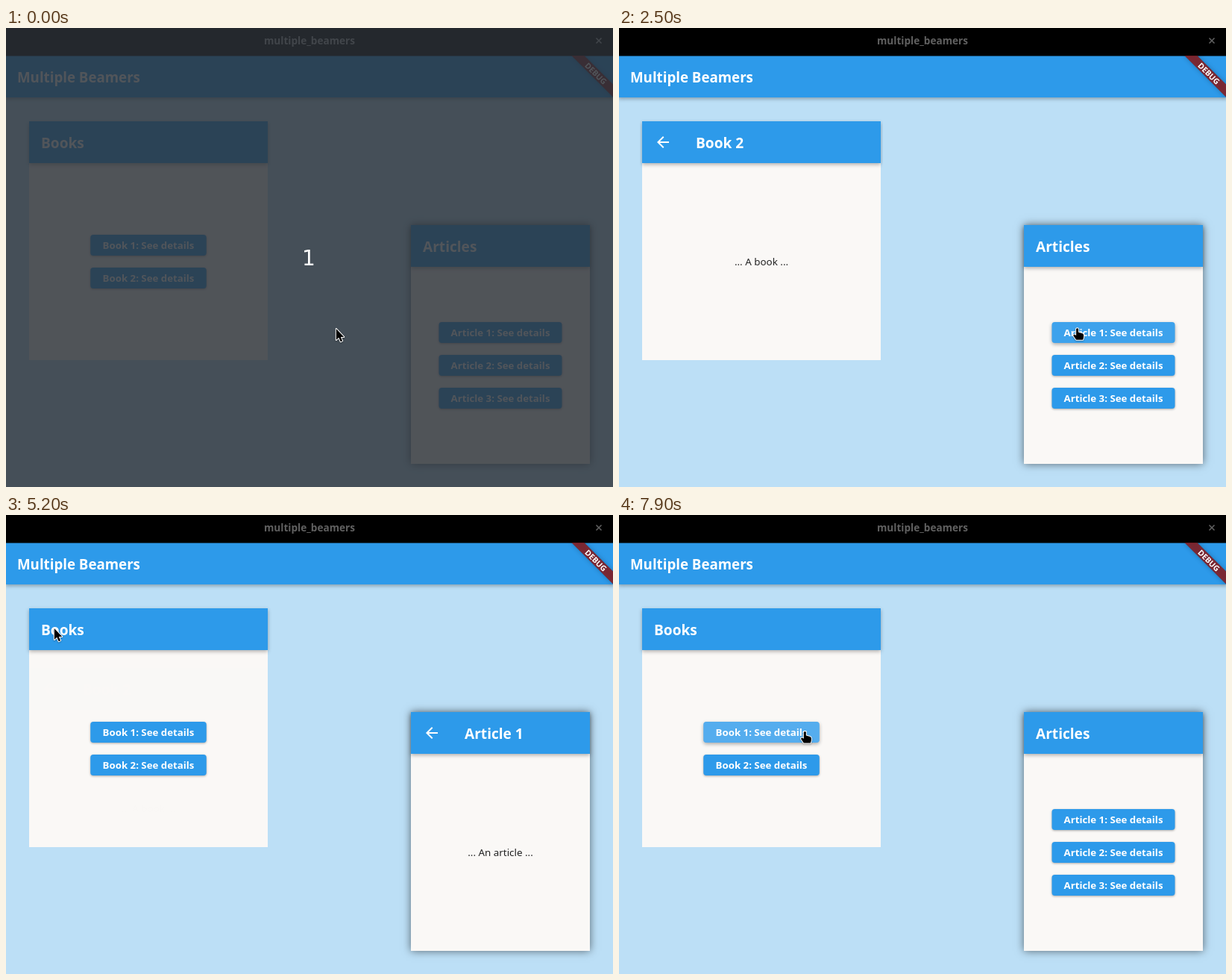
An HTML page with a canvas for the animation above (8000 ms loop, 814 by 615 pixels).

```html
<!DOCTYPE html>
<html lang="en">
<head>
<meta charset="utf-8">
<title>multiple_beamers</title>
<style>
html, body { margin: 0; width: 100%; height: 100%; overflow: hidden; background: #bcdff6; }
canvas { display: block; }
</style>
</head>
<body>
<canvas id="stage" width="814" height="615"></canvas>
<script>
const W = 814, H = 615, LOOP = 8000, STEP = 100, LAG = 100;
const APP_RIGHT = 815, APP_TOP = 37, BAR_H = 56, BUTTON_H = 28;
const BLUE = '#2d9aea', SKY = '#bcdff6', PAPER = '#faf8f6';
const FONT = '"Noto Sans", "Open Sans", sans-serif';
const stage = document.getElementById('stage').getContext('2d');
const layerCanvas = document.createElement('canvas');
layerCanvas.width = W;
layerCanvas.height = H;
const layer = layerCanvas.getContext('2d');

const backIcon = new Path2D('M20 11H7.83l5.59-5.59L12 4l-8 8 8 8 1.41-1.41L7.83 13H20v-2z');
const arrow = new Path2D('M0 0V15L3.5 11.8L5.9 17.3L8.3 16.2L6 11H10.4Z');
const hand = new Path2D('M-1 1Q.7-1 2 1V5.5L7.5 7Q9 7.6 9 9.5V12Q8.6 13.5 8 15.5H-1L-4.6 10.2Q-5.2 8.2-3 8.4L-1 9.8Z');

// opens and closes hold the start and end of each page transition
const books = {
  x: 31, y: 125, w: 320, h: 320, title: 'Books', item: 'Book', count: 2, open: 2,
  body: '... A book ...', buttonW: 155.5, clipped: true,
  opens: [1300, 1430], closes: [4910, 5210]
};
const articles = {
  x: 543, y: 264, w: 240, h: 320, title: 'Articles', item: 'Article', count: 3, open: 1,
  body: '... An article ...', buttonW: 165, clipped: false,
  opens: [2780, 3080], closes: [6240, 6540]
};

// start, end and destination of each pointer move
const origin = [442, 402];
const moves = [
  [0, 800, 237, 340], [1700, 2600, 618, 402], [3900, 4150, 674, 436], [4150, 4700, 64, 151],
  [5300, 5500, 249, 320], [5600, 6100, 562, 297], [7200, 7900, 248, 289]
];

const clamp = v => Math.max(0, Math.min(1, v));
const ramp = (t, [from, to]) => clamp((t - from) / (to - from));
const mix = (a, b, k) => a + (b - a) * k;
const easeOut = k => 1 - (1 - k) ** 2;

function bezier(x1, y1, x2, y2) {
  const axis = (a, b, s) => 3 * a * s * (1 - s) ** 2 + 3 * b * s * s * (1 - s) + s ** 3;
  return x => {
    let lo = 0, hi = 1;
    for (let i = 0; i < 24; i++) {
      const mid = (lo + hi) / 2;
      if (axis(x1, x2, mid) < x) lo = mid; else hi = mid;
    }
    return axis(y1, y2, lo);
  };
}
const easeIn = bezier(0.42, 0, 1, 1);
const fastOutSlowIn = bezier(0.4, 0, 0.2, 1);

function pointerAt(t) {
  let [x, y] = origin;
  for (const [from, to, toX, toY] of moves) {
    const k = easeOut(ramp(t, [from, to]));
    x = mix(x, toX, k);
    y = mix(y, toY, k);
  }
  return [x, y];
}

const detailShare = (p, t) => ramp(t, p.opens) - ramp(t, p.closes);
const clickable = (p, t) => [p.opens, p.closes].every(([from, to]) => t < from - LAG || t >= to);

function buttonBox(p, i) {
  const pitch = BUTTON_H + 16;
  const top = p.y + BAR_H + (p.h - BAR_H - p.count * pitch + 16) / 2;
  return [p.x + (p.w - p.buttonW) / 2, Math.round(top + pitch * (i - 1)), p.buttonW, BUTTON_H];
}

const inside = ([px, py], [x, y, w, h]) => px >= x && px < x + w && py >= y && py < y + h;
const overButton = (p, i, t) => inside(pointerAt(t), buttonBox(p, i));
const overBack = (p, t) => inside(pointerAt(t), [p.x, p.y, BAR_H, BAR_H]);

function overTarget(p, t) {
  if (!clickable(p, t)) return false;
  if (detailShare(p, t) === 1) return overBack(p, t);
  for (let i = 1; i <= p.count; i++) if (overButton(p, i, t)) return true;
  return false;
}

function text(c, str, x, y, size, color = '#fff', weight = 600, align = 'left') {
  c.font = `${weight} ${size}px ${FONT}`;
  c.fillStyle = color;
  c.textAlign = align;
  c.fillText(str, x, y);
}

function shadowed(c, blur, dy, alpha, draw) {
  c.save();
  c.shadowColor = `rgba(0,0,0,${alpha})`;
  c.shadowBlur = blur;
  c.shadowOffsetY = dy;
  draw();
  c.restore();
}

function bar(c, x, y, w) {
  c.fillStyle = BLUE;
  shadowed(c, 5, 2, 0.3, () => c.fillRect(x, y, w, BAR_H));
}

function disc(c, x, y, r, alpha) {
  c.fillStyle = `rgba(255,255,255,${alpha})`;
  c.beginPath();
  c.arc(x, y, r, 0, 7);
  c.fill();
}

function button(c, p, i, t) {
  const [x, y, w, h] = buttonBox(p, i);
  const hover = overButton(p, i, t);
  const shape = new Path2D();
  shape.roundRect(x, y, w, h, 4);
  c.fillStyle = BLUE;
  shadowed(c, hover ? 5 : 3, hover ? 2 : 1, 0.32, () => c.fill(shape));
  if (hover) {
    c.save();
    c.clip(shape);
    c.fillStyle = 'rgba(255,255,255,.08)';
    c.fill(shape);
    const start = p.opens[0] - LAG;
    const grow = ramp(t, [start, start + 300]);
    if (grow) disc(c, ...pointerAt(t), 150 * grow, 0.12);
    c.restore();
  }
  text(c, `${p.item} ${i}: See details`, p.x + p.w / 2, y + 19, 13.25, '#fff', 600, 'center');
}

function page(c, p) {
  c.fillStyle = PAPER;
  c.fillRect(p.x, p.y, p.w, p.h);
  bar(c, p.x, p.y, p.w);
}

function listPage(c, p, t) {
  page(c, p);
  text(c, p.title, p.x + 16, p.y + 36, 19.1);
  for (let i = 1; i <= p.count; i++) button(c, p, i, t);
}

function detailPage(c, p, t) {
  page(c, p);
  const cx = p.x + 28, cy = p.y + 28;
  c.save();
  c.beginPath();
  c.rect(p.x, p.y, p.w, BAR_H);
  c.clip();
  if (overBack(p, t)) disc(c, cx, cy, 27, 0.03);
  const start = p.closes[0] - LAG;
  const grow = ramp(t, [start, start + 150]);
  if (grow) disc(c, cx, cy, mix(10, 35, grow), 0.09);
  c.restore();
  c.save();
  c.translate(cx - 12, cy - 12);
  c.fillStyle = '#fff';
  c.fill(backIcon);
  c.restore();
  text(c, `${p.item} ${p.open}`, p.x + 72, p.y + 36, 19.1);
  text(c, p.body, p.x + p.w / 2, p.y + 193, 13.4, '#222', 400, 'center');
}

// the detail page fades in while it slides up a quarter of its height
function panel(p, t) {
  const k = detailShare(p, t);
  if (k < 1) listPage(stage, p, t);
  if (k === 0) return;
  layer.clearRect(0, 0, W, H);
  detailPage(layer, p, t);
  stage.save();
  if (p.clipped) {
    stage.beginPath();
    stage.rect(p.x - 3, p.y - 3, p.w + 6, p.h + 3);
    stage.clip();
  }
  stage.globalAlpha = easeIn(k);
  stage.drawImage(layerCanvas, 0, p.h / 4 * (1 - fastOutSlowIn(k)));
  stage.restore();
}

function titleBar(t) {
  const fade = ramp(t, [1100, 1500]);
  const black = mix(5, 0, fade), grey = mix(165, 96, fade);
  stage.fillStyle = `rgb(${black},${black},${black})`;
  stage.fillRect(0, 0, W, APP_TOP + 0.5);
  const ink = `rgb(${grey},${grey},${grey})`;
  text(stage, 'multiple_beamers', 407, 22, 13.6, ink, 600, 'center');
  stage.strokeStyle = ink;
  stage.lineWidth = 1.6;
  stage.beginPath();
  for (const side of [-3.5, 3.5]) {
    stage.moveTo(795 - side, 13.5);
    stage.lineTo(795 + side, 20.5);
  }
  stage.stroke();
}

function debugBanner() {
  stage.save();
  stage.beginPath();
  stage.rect(0, APP_TOP, W, H);
  stage.clip();
  stage.translate(APP_RIGHT, APP_TOP);
  stage.rotate(Math.PI / 4);
  stage.fillStyle = 'rgba(0,0,0,.5)';
  shadowed(stage, 6, 0, 0.5, () => stage.fillRect(-40, 28, 80, 12));
  stage.fillStyle = 'rgba(183,28,28,.627)';
  stage.fillRect(-40, 28, 80, 12);
  text(stage, 'DEBUG', 0, 37.8, 10.4, '#fff', 900, 'center');
  stage.restore();
}

function pointer(t) {
  const [x, y] = pointerAt(t);
  const shape = overTarget(books, t) || overTarget(articles, t) ? hand : arrow;
  stage.save();
  stage.translate(x + 0.8, y + 1);
  stage.lineJoin = 'round';
  stage.lineWidth = 2;
  stage.strokeStyle = '#fff';
  shadowed(stage, 2, 1, 0.3, () => stage.stroke(shape));
  stage.fillStyle = '#000';
  stage.fill(shape);
  stage.restore();
}

function countdown(t) {
  const level = (1 - ramp(t, [0, 400])) ** 1.5;
  stage.save();
  stage.globalAlpha = level * 0.82;
  stage.fillStyle = 'rgb(43,48,54)';
  stage.fillRect(0, 0, W, H);
  stage.globalAlpha = level;
  stage.font = '28px "DejaVu Sans", sans-serif';
  stage.fillStyle = '#fff';
  stage.textAlign = 'center';
  stage.fillText('1', 406, 318);
  stage.restore();
}

function draw(t) {
  stage.fillStyle = SKY;
  stage.fillRect(0, 0, W, H);
  bar(stage, -1, APP_TOP, APP_RIGHT + 1);
  text(stage, 'Multiple Beamers', 15, 73, 18.7);
  titleBar(t);
  debugBanner();
  panel(books, t);
  stage.fillStyle = PAPER;
  shadowed(stage, 11, 0, 0.55, () => stage.fillRect(articles.x, articles.y, articles.w, articles.h));
  panel(articles, t);
  countdown(t);
  pointer(t);
}

const start = performance.now();
function tick() {
  const t = (performance.now() - start) % LOOP;
  draw(Math.floor(t / STEP) * STEP);
  requestAnimationFrame(tick);
}
tick();
</script>
</body>
</html>
```
